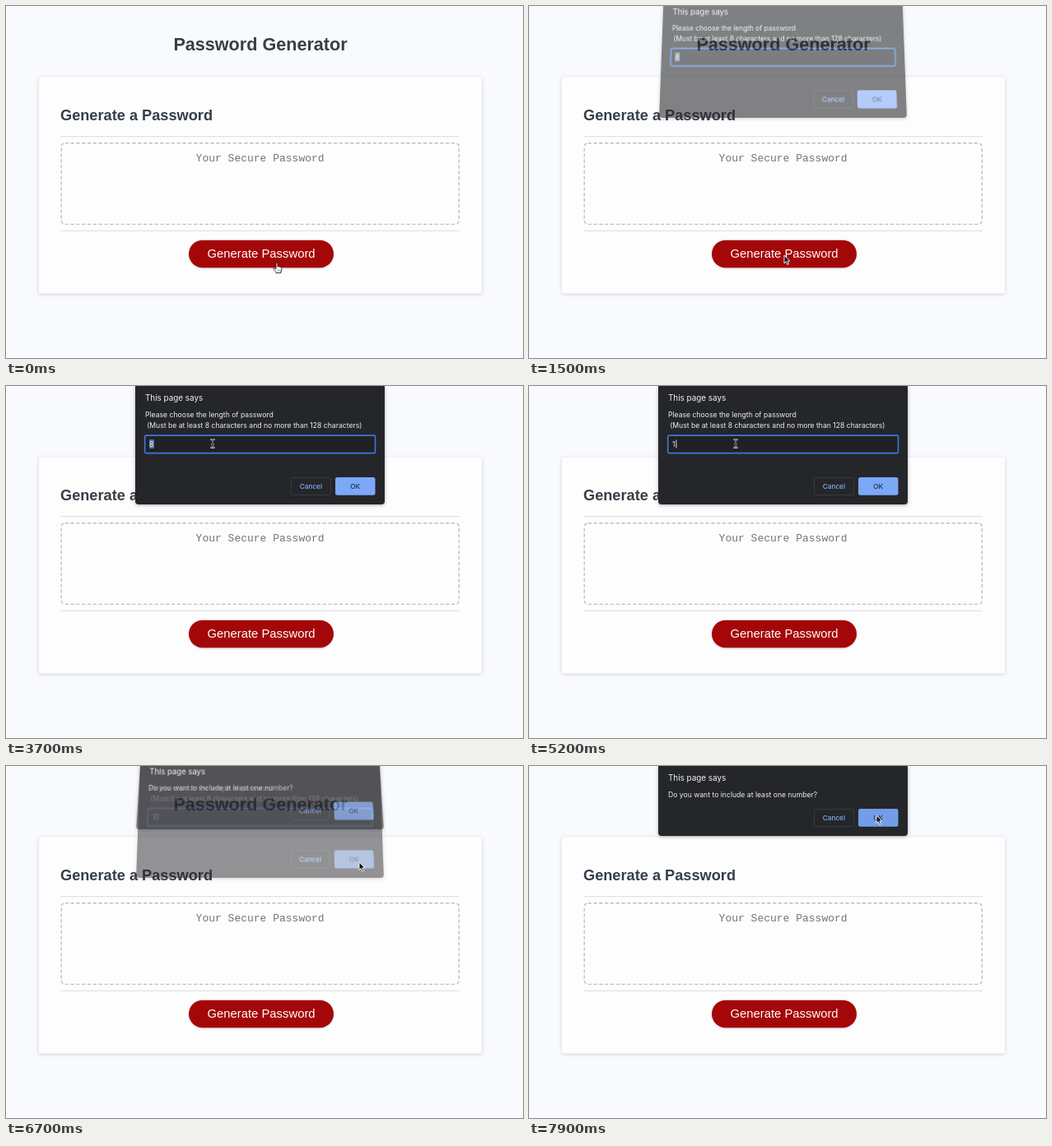
These frames come from a looping animation (628 by 428 pixels, 8000 ms). An HTML page:

```html
<!DOCTYPE html>
<html lang="en">
<head>
<meta charset="utf-8">
<title>Password Generator</title>
<style>
  html, body { margin: 0; width: 100%; height: 100%; overflow: hidden; background: #f8fafd; }
  svg { position: absolute; left: 0; top: 0; overflow: visible; display: block; }
  text { white-space: pre; }
  .page text { font-family: "Liberation Sans", Arial, sans-serif; }
  .page .mono { font-family: "Liberation Mono", "Courier New", monospace; }
  .dialog {
    position: absolute; left: 157px; top: 0; width: 303px;
    background: #252629; border-radius: 0 0 4px 4px;
    box-shadow: 0 1px 4px rgba(0, 0, 0, .3);
    transform-origin: 50% 100%;
  }
  .dialog text { font-family: Inter, Roboto, sans-serif; }
  .card { filter: drop-shadow(0 1px 2px rgba(40, 45, 60, .2)); }
  .button { filter: drop-shadow(0 1px 1px rgba(40, 45, 60, .22)); }
</style>
</head>
<body>
<svg class="page" width="628" height="428" viewBox="0 0 628 428">
  <rect width="628" height="428" fill="#f8fafd"/>
  <text x="309" y="54" font-size="21.6" font-weight="700" fill="#363e47" text-anchor="middle">Password Generator</text>
  <rect class="card" x="40" y="86.5" width="538" height="263" rx="2" fill="#fdfdfe"/>
  <text x="66" y="138.6" font-size="18.2" font-weight="700" fill="#363e47">Generate a Password</text>
  <path d="M66.500 158.700H551M66.500 273.300H551" stroke="#e0e1e4" stroke-width="1.3"/>
  <rect x="67.200" y="166.700" width="483" height="98.700" rx="4.500" fill="none" stroke="#bdbec1" stroke-width="1.350" stroke-dasharray="4.2 2.6"/>
  <text class="mono" x="308.600" y="189" font-size="13" fill="#727477" text-anchor="middle">Your Secure Password</text>
  <rect class="button" x="222" y="284.700" width="176" height="33.500" rx="16.750" fill="#a40708"/>
  <text x="310" y="306.300" font-size="14.850" fill="#fff" text-anchor="middle">Generate Password</text>
</svg>

<div class="dialog" id="prompt" style="height:144px"></div>
<div class="dialog" id="confirm" style="height:85px"></div>

<svg width="628" height="428" viewBox="0 0 628 428">
  <g id="hand">
    <path d="M-1 7.500V.9A.95.95 0 0 1 .9.9V4.600Q1.500 3.900 2.600 4.600Q3.400 4.100 4.200 5Q5.600 4.700 5.800 6.200V8Q5.800 9.500 5 10.500V12H-1V11Q-2.600 9.300-3.800 7.200Q-4.500 6-3.400 5.900Q-2.400 6-1 7.500Z"
      fill="#fff" stroke="#222" stroke-width=".9" stroke-linejoin="round"/>
    <path d="M1.100 8V10.200M2.700 8V10.200M4.200 8V10.200" stroke="#333" stroke-width=".5"/>
  </g>
  <path id="arrow" d="M0 0V9.600L2.200 7.500L3.800 11.200L5.500 10.500L3.900 6.900H6.900Z"
    fill="#111" stroke="#fff" stroke-width=".9" stroke-linejoin="round"/>
  <g id="beam" fill="none">
    <path d="M-2.600-5Q0-5 0-3V3Q0 5-2.600 5M2.600-5Q0-5 0-3V3Q0 5 2.600 5M-1.500 1H1.500" stroke="#e8e8e8" stroke-width="1.900"/>
    <path d="M-2.600-5Q0-5 0-3V3Q0 5-2.600 5M2.600-5Q0-5 0-3V3Q0 5 2.600 5M-1.500 1H1.500" stroke="#111" stroke-width=".7"/>
  </g>
</svg>

<script>
const LOOP = 8000, STEP = 100;
const $ = id => document.getElementById(id);
const show = (el, on) => { el.style.display = on ? '' : 'none'; };

const text = (x, y, size, fill, str, extra = '') =>
  `<text x="${x}" y="${y}" font-size="${size}" fill="${fill}" ${extra}>${str}</text>`;

const buttons = (y, id) => {
  const label = 'text-anchor="middle" font-weight="500"';
  return `<rect x="346.500" y="${y + .5}" width="48" height="21" rx="2.500" fill="none" stroke="#37393d"/>` +
    text(370.4, y + 13.7, 8.2, '#84adf8', 'Cancel', label) +
    `<rect id="${id}" x="400" y="${y}" width="48.500" height="21.700" rx="2.500"/>` +
    text(424.2, y + 13.7, 8.2, '#1f2c49', 'OK', label);
};

const dialog = (id, h, body) => {
  $(id).innerHTML = `<svg width="303" height="${h}" viewBox="157 0 303 ${h}">` +
    text(169, 18.2, 9.9, '#f1f2f4', 'This page says') + body + '</svg>';
};

const line = (x, y, str) => text(x, y, 8.63, '#eceef0', str);

dialog('prompt', 144,
  line(169, 37.6, 'Please choose the length of password') +
  line(171.2, 51.1, '(Must be at least 8 characters and no more than 128 characters)') +
  '<rect x="168.700" y="60.100" width="279.800" height="21.500" rx="1.500" fill="#202124" stroke="#3d77dd" stroke-width="1.600"/>' +
  '<rect id="mark" x="174" y="65" width="6" height="11" fill="#58729c"/>' +
  text(174, 73.6, 8.6, '#f1f2f4', '', 'id="value"') +
  '<path id="caret" d="M0 65.500V75.500" stroke="#f1f2f4" stroke-width=".9"/>' +
  buttons(111, 'ok1'));

dialog('confirm', 85,
  line(169, 37.6, 'Do you want to include at least one number?') +
  buttons(52, 'ok2'));

// Pointer path: time, x, y
const path = [
  [0, 329, 312.5], [400, 310, 304], [1200, 310, 304], [1300, 310, 303.2],
  [1800, 310, 303.2], [2200, 281, 46], [2400, 251, 70], [5900, 251, 70],
  [6500, 429, 117], [7300, 429, 117], [7900, 422, 60], [LOOP, 422, 60]
];

function pointer(t) {
  const i = path.findIndex((p, n) => n && t <= p[0]);
  const [t0, x0, y0] = path[i - 1], [t1, x1, y1] = path[i];
  const u = (t - t0) / (t1 - t0), e = u * u * (3 - 2 * u);
  return [x0 + (x1 - x0) * e, y0 + (y1 - y0) * e];
}

// Fold leans the sheet back and lifts it slightly while it fades.
function pose(el, h, fold, opacity) {
  show(el, opacity > 0);
  el.style.opacity = opacity;
  el.style.transform = fold
    ? `translateY(${-8 * fold}px) scale(${1 - .007 * fold}) ` +
      `matrix3d(1,0,0,0, 0,${1 + .035 * fold},0,${-.037 / h * fold}, 0,0,1,0, 0,0,0,1)`
    : 'none';
}

function okFill(x, y, top, pressed) {
  if (pressed) return '#6b8ac4';
  const over = x > 400 && x < 448 && y > top && y < top + 22;
  return over ? '#739de8' : '#7ca8f8';
}

function draw(time) {
  const t = Math.floor(time / STEP) * STEP;
  const [x, y] = pointer(t);

  if (t < 1500 || t >= 6800) pose($('prompt'), 144, 0, 0);
  else if (t < 1600) pose($('prompt'), 144, 1, .58);
  else if (t < 6700) pose($('prompt'), 144, 0, 1);
  else pose($('prompt'), 144, 1, .5);

  if (t < 6700) pose($('confirm'), 85, 0, 0);
  else if (t < 6800) pose($('confirm'), 85, 1, .58);
  else if (t < 6900) pose($('confirm'), 85, .15, .95);
  else pose($('confirm'), 85, 0, 1);

  $('value').textContent = t < 5200 ? '8' : t < 5700 ? '1' : '10';
  show($('mark'), t < 5200);
  show($('caret'), t >= 5200 && t < 6000);
  $('caret').setAttribute('transform', `translate(${t < 5700 ? 178.9 : 184.2} 0)`);
  $('ok1').setAttribute('fill', okFill(x, y, 111, t >= 6600));
  $('ok2').setAttribute('fill', okFill(x, y, 52, false));

  const inField = t >= 1600 && t < 6700 && y > 60 && y < 82;
  const kind = t < 1300 ? 'hand' : inField ? 'beam' : 'arrow';
  for (const id of ['hand', 'arrow', 'beam']) show($(id), id === kind);
  $(kind).setAttribute('transform', `translate(${x} ${y})`);
}

const start = performance.now();
function tick() {
  draw((performance.now() - start) % LOOP);
  requestAnimationFrame(tick);
}
tick();
</script>
</body>
</html>
```
